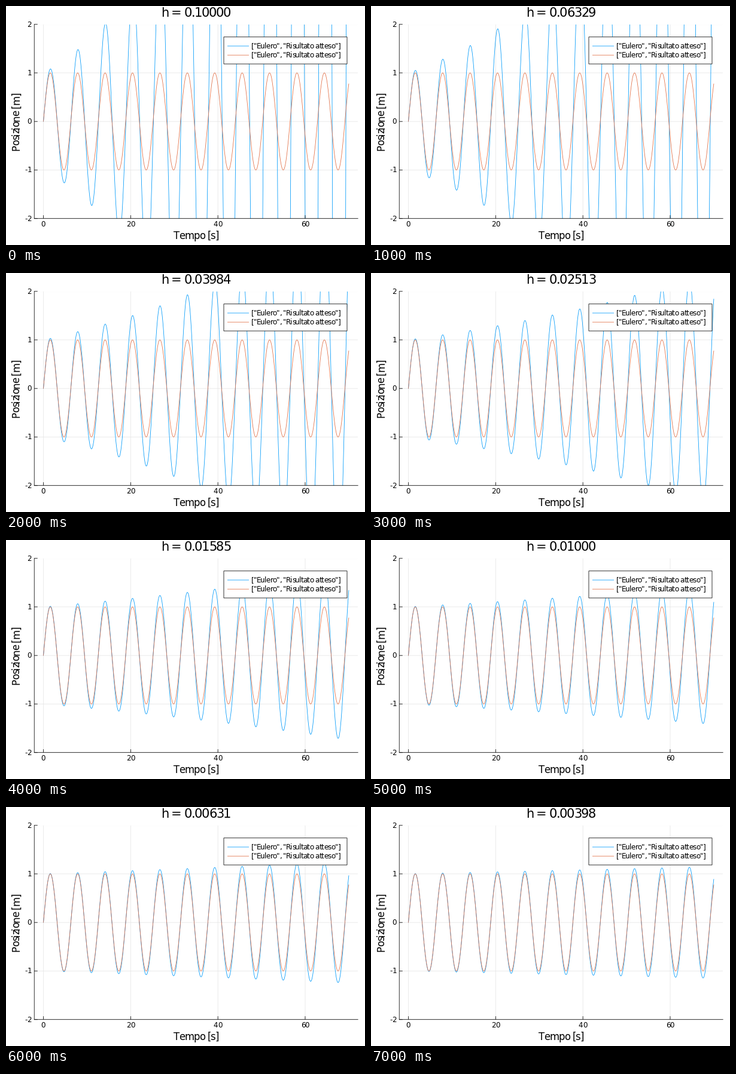
These frames come from a looping animation (600x400 px, 8 s). A matplotlib script:

```python
import numpy as np
import matplotlib.pyplot as plt
from matplotlib.animation import FuncAnimation
from matplotlib.patches import Rectangle
from matplotlib.textpath import TextPath

W, H, DPI = 600, 400, 100
PX = 72 / DPI  # points per pixel
LINE = 0.8 * PX
T_END = 70
LEFT, RIGHT, TOP, BOTTOM = 47.24, 588.19, 30.7, 355.7
BLUE, ORANGE = "#009afa", "#e26f46"
SMALL, MEDIUM, LARGE = 12, 16.5, 21  # font sizes in pixels
TRACKING = -0.065  # letter spacing in em
TICK = 5.5

plt.rcParams["font.family"] = "DejaVu Sans"
plt.rcParams["path.simplify"] = False
plt.rcParams["path.snap"] = False

fig = plt.figure(figsize=(W / DPI, H / DPI), dpi=DPI, facecolor="white")

# Plot area in data units
ax = fig.add_axes([LEFT / W, 1 - BOTTOM / H, (RIGHT - LEFT) / W, (BOTTOM - TOP) / H])
ax.set_xlim(-0.03 * T_END, 1.03 * T_END)
ax.set_ylim(-2, 2)
ax.set_xticks(range(0, 61, 20))
ax.set_yticks(range(-2, 3))
ax.set_axisbelow(True)
ax.grid(color="#e6e6e6", lw=LINE)
ax.tick_params(length=0, labelbottom=False, labelleft=False)
for side in ("top", "right"):
    ax.spines[side].set_visible(False)
for side in ("left", "bottom"):
    ax.spines[side].set_linewidth(LINE)

# Whole stage in pixels, for ticks, text and legend
stage = fig.add_axes([0, 0, 1, 1])
stage.set_xlim(0, W)
stage.set_ylim(H, 0)
stage.axis("off")


def right_edge(text):
    return TextPath((0, 0), text, size=1).get_extents().x1


def advance(char):
    return right_edge(char + "|") - right_edge("|")


def label(x, y, text, size, align=0.5, vertical=False):
    """Draw tracked text; align is 0 for left, 0.5 for centre, 1 for right."""
    steps = [(advance(c) + TRACKING) * size for c in text]
    pos = -align * (sum(steps) - TRACKING * size)
    chars = []
    for c, step in zip(text, steps):
        cx, cy = (x, y - pos) if vertical else (x + pos, y)
        chars.append(stage.text(cx, cy, c, fontsize=size * PX, ha="left",
                                va="baseline", rotation=90 if vertical else 0,
                                rotation_mode="anchor"))
        pos += step
    return chars


def line(xs, ys, color="black"):
    stage.plot(xs, ys, color=color, lw=LINE, solid_capstyle="butt")


def x_px(t):
    return LEFT + (t + 0.03 * T_END) / (1.06 * T_END) * (RIGHT - LEFT)


def y_px(v):
    return TOP + (2 - v) / 4 * (BOTTOM - TOP)


for t in range(0, 61, 20):
    line([x_px(t)] * 2, [BOTTOM, BOTTOM - TICK])
    label(x_px(t), 369, str(t), SMALL)
for v in range(-2, 3):
    line([LEFT, LEFT + TICK], [y_px(v)] * 2)
    label(43, y_px(v) + 4, str(v), SMALL, align=1)

label(318, 389.5, "Tempo [s]", MEDIUM)
label(22.5, 193, "Posizione [m]", MEDIUM, vertical=True)
title = label(317.7, 18, "h = 0.00000", LARGE)

# Legend
stage.add_patch(Rectangle((364, 51.8), 206, 45.2, fc="white", ec="black", lw=LINE))
for y, color in ((67, BLUE), (82.2, ORANGE)):
    line([370, 406], [y, y], color)
    label(410, y + 4, '["Eulero", "Risultato atteso"]', SMALL, align=0)

euler, = ax.plot([], [], color=BLUE, lw=LINE)
times = np.linspace(0, T_END, 2001)
ax.plot(times, np.sin(times), color=ORANGE, lw=LINE)


def update(k):
    steps = 7 * round(10 ** (2 + k / 5))
    h = T_END / steps
    n = np.arange(steps + 1)
    # Closed form of explicit Euler for x'' = -x, x(0) = 0, v(0) = 1
    x = (1 + h * h) ** (n / 2) * np.sin(n * np.arctan(h))
    euler.set_data(n * h, x)
    # All digits share one width, so only the characters change
    for char, c in zip(title, f"h = {h:.5f}"):
        char.set_text(c)
    return euler, *title


anim = FuncAnimation(fig, update, frames=8, interval=1000, repeat=True)
plt.show()
```
